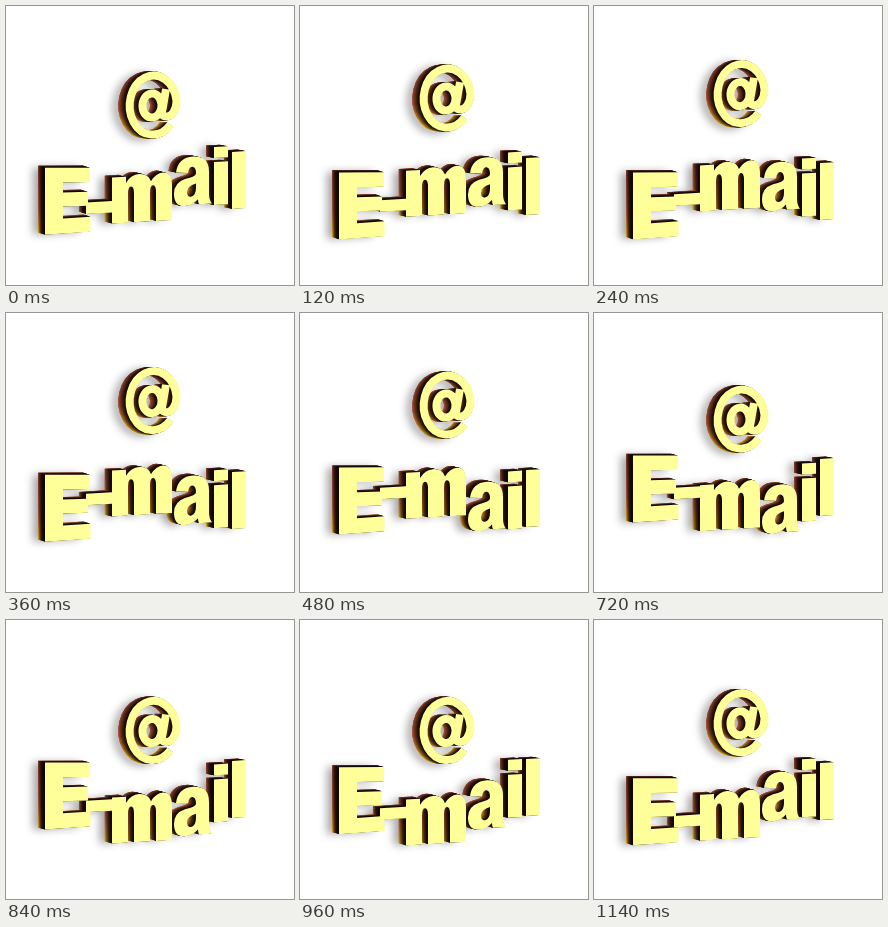
Animation, 288 px wide and 279 px high, one loop 1.2 s. Source, as an HTML page with a canvas:

```html
<!DOCTYPE html>
<html lang="en">
<head>
<meta charset="utf-8">
<title>E-mail</title>
<style>
html, body { margin: 0; width: 100%; height: 100%; overflow: hidden; background: #fff; }
canvas { display: block; }
</style>
</head>
<body>
<canvas id="stage" width="288" height="279" role="img" aria-label="@ E-mail"></canvas>
<script>
const ctx = document.getElementById('stage').getContext('2d');
const LOOP = 1200, STEP = 60, LAYERS = 14;
const FACE = '#ffff99';

// x, y: resting anchor; amp: bob height; peak: time of the lowest point;
// mid: anchor to centre; falloff: how fast the side darkens towards the face
const glyph = (d, x, y, amp, peak, opts = {}) =>
  ({ path: new Path2D(d), x, y, amp, peak, shear: -0.06, mid: -28, line: 0, falloff: 3, ...opts });

const glyphs = [
  glyph('M17.500 19.500A23.500 29.500 0 1 1 23.500 -4C23.500 6 18 11.500 14 11.500' +
        'C9 11.500 8.500 8 9.500 4L13 -16M8.500 -1A9.500 12 0 1 1 -10.500 1A9.500 12 0 1 1 8.500 -1Z',
        147, 99.5, 12, 900, { line: 8, mid: 0, shear: -0.03, falloff: 1.4 }),
  glyph('M0 0V-67L45 -64V-49.500L18 -51V-41L43 -40V-26L18 -27V-15H45.500V0Z',
        39, 221.5, 12.5, 180, { shear: -0.07 }),
  glyph('M0 6V-5.500H26V6Z', 80, 190, 12, 0, { mid: 0 }),
  glyph('M0 0V-46H14V-40Q19 -48 27 -48Q36 -48 39 -40Q44 -48 51 -48Q60 -48 60 -34V0H44V-29' +
        'Q44 -36 41 -36Q38 -36 38 -29V0H22V-29Q22 -36 19 -36Q16 -36 16 -29V0Z',
        106, 214.5, 11, 955, { falloff: 2 }),
  glyph('M2 -33Q4 -48 19 -48Q35 -48 35 -32V-10Q35 -4 38 0H25Q24 -2 24 -5Q18 1 11 1Q0 1 0 -12' +
        'Q0 -23 11 -26Q22 -28 22 -31Q22 -38 18 -38Q15 -38 14 -32Z' +
        'M22 -21Q13 -19 13 -13Q13 -8 17 -8Q22 -9 22 -17Z',
        168, 210.5, 11, 640, { falloff: 1.8 }),
  glyph('M0 0V-43H14V-0ZM0 -47V-58H14V-47Z', 208, 206.5, 10, 460),
  glyph('M0 0V-57H14V0Z', 226, 206, 10, 360)
];

function paint(g, y, depth, color) {
  const dx = -(6.5 + g.x / 150) * depth;
  const dy = -(y + g.mid - 100) * 0.022 * depth;
  ctx.setTransform(1, g.shear, 0, 1, g.x + dx, y + dy);
  if (g.line) {
    ctx.lineWidth = g.line;
    ctx.strokeStyle = color;
    ctx.stroke(g.path);
  } else {
    ctx.fillStyle = color;
    ctx.fill(g.path, 'evenodd');
  }
}

// Copper above, gold below, fading to near black at the face
function sideColor(g, depth) {
  const k = Math.pow(depth, g.falloff);
  const shade = (r, gr, b) => `rgb(${14 + r * k},${5 + gr * k},${4 + b * k})`;
  const fill = ctx.createLinearGradient(0, g.mid - 32, 0, g.mid + 32);
  fill.addColorStop(0, shade(105, 48, 34));
  fill.addColorStop(0.55, shade(150, 72, 42));
  fill.addColorStop(1, shade(205, 160, 20));
  return fill;
}

function draw(t) {
  ctx.setTransform(1, 0, 0, 1, 0, 0);
  ctx.fillStyle = '#fff';
  ctx.fillRect(0, 0, 288, 279);

  const posed = glyphs.map(g =>
    [g, g.y + g.amp * Math.cos((t - g.peak) / LOOP * Math.PI * 2)]);

  ctx.shadowColor = 'rgba(0,0,0,.36)';
  ctx.shadowBlur = 9;
  ctx.shadowOffsetX = -5;
  ctx.shadowOffsetY = 2;
  for (const [g, y] of posed) paint(g, y, 1, sideColor(g, 1));
  ctx.shadowColor = 'transparent';

  // Extrude back to front so every face stays above every side
  for (let i = LAYERS; i > 0; i--) {
    const depth = i / LAYERS;
    for (const [g, y] of posed) paint(g, y, depth, sideColor(g, depth));
  }
  for (const [g, y] of posed) paint(g, y, 0, FACE);
}

function tick() {
  const t = performance.now() % LOOP;
  draw(Math.floor(t / STEP) * STEP);
  requestAnimationFrame(tick);
}
tick();
</script>
</body>
</html>
```
